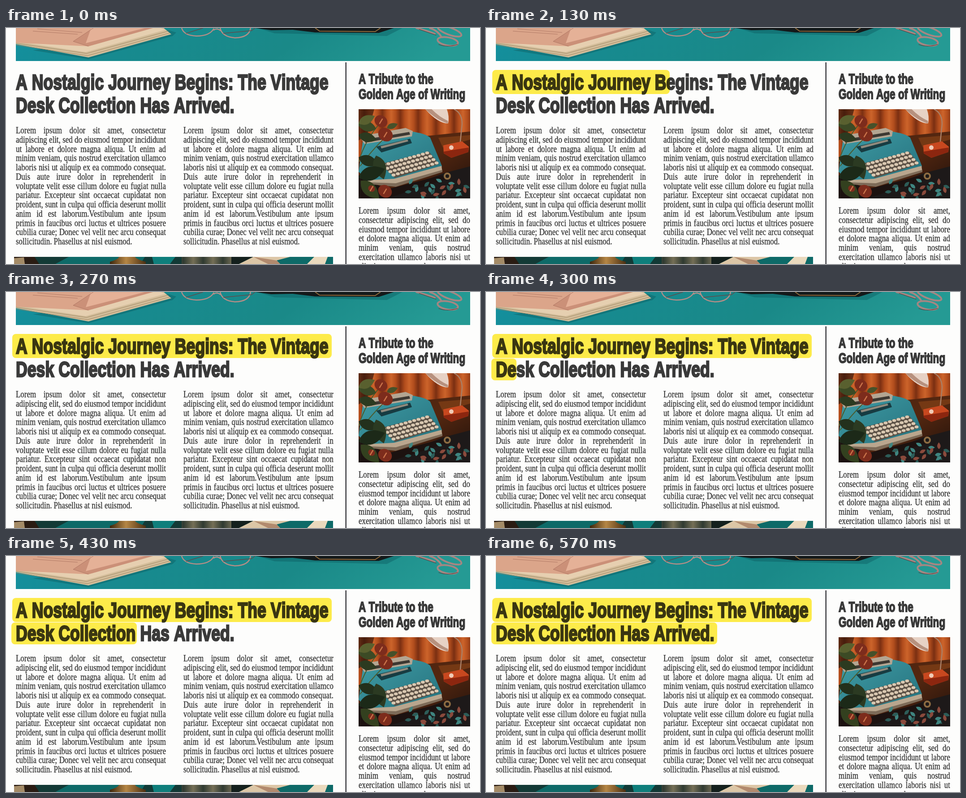
Animation of 1058 by 529 pixels, one loop 600 ms. Source, as an HTML page:

```html
<!DOCTYPE html>
<html lang="en">
<head>
<meta charset="utf-8">
<title>Vintage page</title>
<style>
html, body { margin: 0; width: 100%; height: 100%; overflow: hidden; background: #fdfdfc; }
#stage { position: relative; width: 1058px; height: 529px; overflow: hidden; contain: strict; background: #fdfdfc; }
svg, h1, h2, .col, .mark { position: absolute; margin: 0; }
svg { left: 0; top: 0; }
h1, h2, .col { transform-origin: 0 0; white-space: nowrap; font-kerning: none; font-variant-ligatures: none; }
h1, h2 {
  font-family: "Liberation Sans", Arial, sans-serif; font-weight: 700;
  color: #3a3a3a; transform: scaleX(.728);
}
h1 { left: 22px; top: 95.2px; font-size: 49px; line-height: 52px; -webkit-text-stroke: 3px #3a3a3a; }
h2 { left: 787px; top: 98.2px; font-size: 31px; line-height: 33.5px; -webkit-text-stroke: 2px #3a3a3a; }
.col {
  font: 20.4px/20.75px "Liberation Serif", "Times New Roman", serif;
  color: #303030; -webkit-text-stroke: .3px #303030;
  transform: scaleX(.83); text-align: justify; text-align-last: justify;
}
.col div:last-child { text-align-last: left; }
.mark { background: #ffed4b; border-radius: 8px; mix-blend-mode: multiply; }
#mark1 { left: 14px; top: 94px; height: 54px; }
#mark2 { left: 12px; top: 149px; height: 49px; }
</style>
</head>
<body>
<div id="stage">
<svg width="1058" height="529" viewBox="0 0 1058 529">
  <defs>
    <linearGradient id="desk" x2="1" y2=".1">
      <stop stop-color="#1390a0"/><stop offset=".3" stop-color="#178a8f"/>
      <stop offset=".65" stop-color="#1a8988"/><stop offset="1" stop-color="#259a94"/>
    </linearGradient>
    <linearGradient id="fold" x2="20" gradientUnits="userSpaceOnUse" spreadMethod="reflect">
      <stop stop-color="#7a2f12"/><stop offset=".5" stop-color="#b24d1d"/><stop offset="1" stop-color="#cc642b"/>
    </linearGradient>
    <linearGradient id="wood" x2="1" y2="1">
      <stop stop-color="#4a2210"/><stop offset=".5" stop-color="#542710"/><stop offset="1" stop-color="#1d100c"/>
    </linearGradient>
    <linearGradient id="body" x2="1" y2="1">
      <stop stop-color="#3f9ca6"/><stop offset="1" stop-color="#246f7a"/>
    </linearGradient>
    <linearGradient id="brass">
      <stop stop-color="#3d260c"/><stop offset=".45" stop-color="#b58645"/><stop offset="1" stop-color="#4b2f12"/>
    </linearGradient>
    <linearGradient id="glass" x2="22" gradientUnits="userSpaceOnUse" spreadMethod="reflect">
      <stop stop-color="#2f3a31"/><stop offset="1" stop-color="#756f56"/>
    </linearGradient>
    <clipPath id="topClip"><path d="M22 0H1036V74H22z"/></clipPath>
    <clipPath id="sideClip"><path d="M787 182H1036V382H787z"/></clipPath>
    <clipPath id="stripClip"><path d="M18 513H730V529H18z"/></clipPath>
  </defs>

  <g clip-path="url(#topClip)">
    <path fill="url(#desk)" d="M22 0H1036V74H22z"/>
    <path fill="#0d5e63" opacity=".45" d="M60 50L184 70L372 18L380 10L360 4zM560 0L600 12L700 14L850 18L885 0z"/>
    <path fill="#d3bd9a" d="M22 36L184 66L369 14L352 0H22z"/>
    <path fill="none" stroke="#9d8663" d="M22 38L182 62L366 11M22 34L180 57L362 7"/>
    <path fill="#e6cfb0" d="M22 30L178 54L356 4L345 0H22z"/>
    <path fill="#dba58a" d="M22 0H328L184 41L22 33z"/>
    <path fill="#cb9078" d="M195 0H328L184 41L150 30z"/>
    <path fill="#e5b197" d="M190 0H310L178 34z"/>
    <path fill="none" stroke="#a66f5c" stroke-width=".8" d="M70 2L170 10M60 7L160 14M195 0L150 30L184 41"/>
    <g fill="none" stroke="#b58d86" stroke-width="2.5">
      <path d="M392 0Q397 17 425 18Q455 18 464 1M478 0Q482 20 512 22Q543 21 546 0M463 5Q471 -1 479 6"/>
      <path stroke="#5f4b4c" stroke-width="1.5" d="M402 12L440 0M485 12L548 6L556 0"/>
    </g>
    <path fill="#14191a" d="M556 0L592 5L640 4L690 10L832 11L866 0z"/>
    <path fill="none" stroke="#8f6a3b" stroke-width="2" d="M690 0L700 7L824 8L836 0"/>
    <g fill="none" stroke="#a58682" stroke-width="4" stroke-linecap="round">
      <path d="M916 0Q940 6 957 13M946 0Q963 5 972 20"/>
      <ellipse cx="986" cy="30" rx="23" ry="9" transform="rotate(10 986 30)"/>
      <ellipse cx="990" cy="7" rx="28" ry="8" transform="rotate(20 990 7)"/>
      <path stroke="#553b3b" stroke-width="1.2" d="M922 3L960 16M966 37Q985 44 1008 37"/>
    </g>
  </g>

  <g clip-path="url(#sideClip)">
    <path fill="url(#fold)" d="M787 182H1036V382H787z"/>
    <path fill="#2d150c" opacity=".65" d="M787 182H822L806 240L787 252z"/>
    <path fill="url(#wood)" d="M920 244L1036 232V382H787V300z"/>
    <path fill="#8d4518" opacity=".6" d="M965 246L1036 240V250L975 268z"/>
    <path fill="#e7d2c5" d="M936 182H984Q990 198 987 214Q964 214 936 182z"/>
    <path fill="#b7917e" d="M936 182Q962 207 987 214L986 208Q968 200 950 182z"/>
    <path fill="none" stroke="#a97f66" stroke-width="2.5" d="M1000 182Q1018 190 1018 215L1013 265"/>
    <path fill="#c8481f" d="M976 263L1018 254L1033 266L1032 278L994 291L977 281z"/>
    <path fill="#8c260f" d="M977 277L1032 268V278L994 291L977 281z"/>
    <circle cx="994" cy="268" r="5" fill="#f0cbb7"/>
    <path fill="#1d1919" d="M860 372L975 326L1036 310V382H840z"/>
    <path fill="#1c1210" d="M787 330L850 362L972 330L980 340L850 382H787z"/>
    <path fill="url(#body)" d="M796 256Q800 248 812 246L904 232Q936 236 947 246L973 309L970 322L868 352L806 342L787 322z"/>
    <path fill="#b3a592" d="M789 243L892 224L908 231L906 243L800 260z"/>
    <path fill="#3d3832" d="M800 250L900 233L902 239L802 257z"/>
    <path fill="#173c42" d="M826 266L902 248L906 258L838 279z"/>
    <path fill="#8f8a7d" d="M836 265L896 250L898 254L838 270z"/>
    <path fill="#5b5045" d="M836 305L944 277L966 305L868 336z"/>
    <g id="keys" fill="#d9c8b1"></g>
    <path fill="#b9a68e" d="M866 338L972 309L974 322L870 354L812 348L806 341z"/>
    <path fill="#7d6b58" d="M870 348L974 318V323L870 356L812 350V346z"/>
    <g id="plants"></g>
    <g id="fabric"></g>
  </g>

  <g clip-path="url(#stripClip)">
    <path fill="#0e6a68" d="M18 513H730V529H18z"/>
    <path fill="#2a1c13" d="M18 513H64L76 529H18z"/>
    <path fill="#a48b67" d="M18 516L40 514L42 529H18z"/>
    <path fill="#133a36" d="M64 513H140L110 529H74zM310 513H394V529H300z"/>
    <path fill="#0f7f7c" d="M326 513H378L366 529H330z"/>
    <path fill="url(#brass)" d="M252 513H288Q292 519 312 524V529H232V524Q250 519 252 513z"/>
    <path fill="url(#glass)" d="M392 513H503V529H392z"/>
    <path fill="#14201d" d="M503 513H552L520 529H503z"/>
    <path fill="#dcc6a6" d="M552 513H634L604 521L612 529H520z"/>
    <path fill="#b28a6e" d="M552 513L604 521L612 529H585z"/>
    <path fill="#ead9bd" d="M688 513H718L712 529H672z"/>
  </g>

  <path fill="#3b3b40" d="M757.5 77H760V529H757.5z"/>
</svg>

<h1>A Nostalgic Journey Begins: The Vintage<br>Desk Collection Has Arrived.</h1>
<h2>A Tribute to the<br>Golden Age of Writing</h2>
<div class="mark" id="mark1"></div>
<div class="mark" id="mark2"></div>
</div>

<script>
const $ = id => document.getElementById(id);

const article = `Lorem ipsum dolor sit amet, consectetur
adipiscing elit, sed do eiusmod tempor incididunt
ut labore et dolore magna aliqua. Ut enim ad
minim veniam, quis nostrud exercitation ullamco
laboris nisi ut aliquip ex ea commodo consequat.
Duis aute irure dolor in reprehenderit in
voluptate velit esse cillum dolore eu fugiat nulla
pariatur. Excepteur sint occaecat cupidatat non
proident, sunt in culpa qui officia deserunt mollit
anim id est laborum.Vestibulum ante ipsum
primis in faucibus orci luctus et ultrices posuere
cubilia curae; Donec vel velit nec arcu consequat
sollicitudin. Phasellus at nisl euismod.`;

const sidebar = `Lorem ipsum dolor sit amet,
consectetur adipiscing elit, sed do
eiusmod tempor incididunt ut labore
et dolore magna aliqua. Ut enim ad
minim veniam, quis nostrud
exercitation ullamco laboris nisi ut
aliquip ex ea commodo consequat.`;

function addColumn(text, left, top, width) {
  const col = document.createElement('div');
  col.className = 'col';
  col.style.cssText = `left:${left}px;top:${top}px;width:${width / .83}px`;
  col.innerHTML = text.split('\n').map(line => `<div>${line}</div>`).join('');
  $('stage').append(col);
}
addColumn(article, 22, 218.7, 335);
addColumn(article, 396, 218.7, 335);
addColumn(sidebar, 787, 398.7, 249);

// Typewriter keys: four slanted rows and a space bar.
let keys = '';
for (let row = 0; row < 4; row++)
  for (let i = 0; i < 11; i++)
    keys += `<ellipse cx="${844 + row * 7 + i * 9.6}" cy="${307 + row * 7.5 - i * 2.7}" rx="4.4" ry="3.2"/>`;
$('keys').innerHTML = keys + '<path d="M888 334L950 316L952 319L890 337z"/>';

const leaf = (x, y, length, angle, color) =>
  `<path fill="${color}" transform="translate(${x} ${y}) rotate(${angle})"
    d="M0 0Q${length * .4} ${-length * .5} ${length} 0Q${length * .4} ${length * .5} 0 0z"/>`;
const flower = (x, y, size) =>
  `<ellipse cx="${x}" cy="${y}" rx="${size}" ry="${size * .85}" fill="#7d2c1c" transform="rotate(35 ${x} ${y})"/>
   <path d="M${x - 3} ${y + 5}l6 -10" stroke="#c9734a" stroke-width="2.5" stroke-linecap="round"/>`;
$('plants').innerHTML =
  '<path d="M787 300Q802 250 836 212M790 310Q820 270 846 246" fill="none" stroke="#4c5a2c" stroke-width="2"/>' +
  leaf(826, 226, 44, 195, '#3c4a25') + leaf(787, 214, 40, -25, '#59602f') +
  leaf(787, 240, 42, 15, '#2c3a20') + leaf(850, 224, 26, -20, '#46512a') +
  leaf(787, 290, 48, 20, '#23301c') + leaf(826, 286, 56, 72, '#2b3a22') +
  leaf(787, 335, 62, -18, '#1c2918') + leaf(792, 342, 58, 45, '#33401f') +
  flower(837, 209, 15) + flower(847, 239, 17) + flower(846, 366, 16) + flower(816, 360, 8);

// Printed leaves on the fabric.
let fabric = '';
for (let i = 0; i < 26; i++) {
  const x = 900 + i * 53 % 130, y = 350 + i * 29 % 32 - (x - 900) * .08;
  fabric += leaf(x, y, 15, i * 47 - 60, ['#3f8580', '#8a4a3c', '#2d5c58'][i % 3]);
}
$('fabric').innerHTML = fabric + '<circle cx="985" cy="332" r="6" fill="none" stroke="#8d6c42" stroke-width="4"/>';

// Both highlights grow by equal strides, eighteen per loop.
const LOOP = 600, STEPS = 18;
const start = performance.now();
function draw() {
  const time = (performance.now() - start) % LOOP;
  const step = Math.floor((time + 4) * STEPS / LOOP) % STEPS;
  $('mark1').style.width = (step ? Math.min(step + 1, 9) * 79.2 : 0) + 'px';
  $('mark2').style.width = Math.max(step - 8, 0) * 56 + 'px';
  requestAnimationFrame(draw);
}
draw();
</script>
</body>
</html>
```
